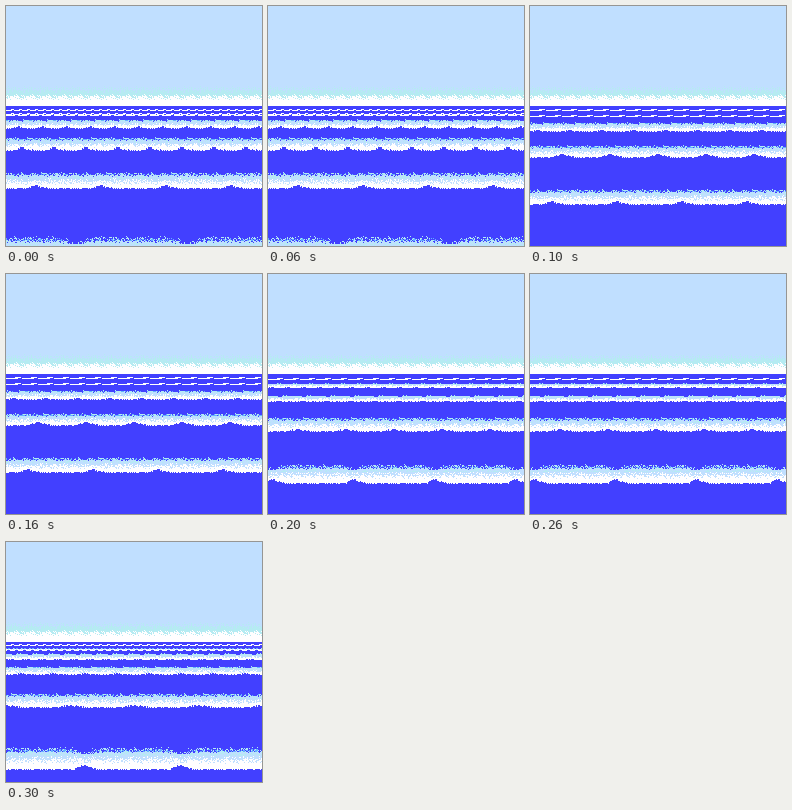
These frames come from a looping animation (256 px wide and 240 px high, 0.4 s). An HTML page with a canvas:

```html
<!DOCTYPE html>
<html lang="en">
<head>
<meta charset="utf-8">
<title>Rolling sea</title>
<style>
  html, body { margin: 0; width: 100%; height: 100%; overflow: hidden; background: #4240ff; }
  canvas { display: block; width: 100vw; height: 100vh; image-rendering: pixelated; }
</style>
</head>
<body>
<canvas id="sea" width="256" height="240"></canvas>
<script>
const WIDTH = 256, HEIGHT = 240, STEP = 100;
const SKY = '#c0dfff', CYAN = '#b5ebf2', WHITE = '#fffeff', SEA = '#4240ff', SPRAY = '#64b0ff';
const ctx = document.getElementById('sea').getContext('2d');

// Each swell: top, bottom, period, x of the first notch, notch depth, notch sharpness
const poses = [
  { ripples: [[104, 8], [108, 8], [109, 12]],
    swells: [[113, 123, 24, 12, 2, 1], [131, 145, 32, 16, 3, 2], [166, 183, 65, 30, 3, 6], [230, 256, 112, 70, 4, 8]] },
  { ripples: [[104, 16], [110, 16]],
    swells: [[116, 126, 32, 8, 1, 1], [139, 152, 48, 32, 3, 2], [183, 199, 65, 22, 3, 6]] },
  { ripples: [[105, 16]],
    swells: [[109, 114, 16, 4, 1, 1], [121, 128, 24, 10, 1, 1], [143, 158, 48, 30, 2, 2], [190, 210, 81, 5, 4, 8]] },
  { ripples: [[103, 8]],
    swells: [[106, 109, 8, 2, 1, 1], [111, 118, 16, 6, 1, 1], [124, 133, 32, 16, 1, 1], [151, 166, 64, 0, 2, 2], [205, 228, 96, 78, 4, 8]] }
];

function noise(x, y, seed) {
  let h = Math.imul(x + 17, 374761393) ^ Math.imul(y + 31, 668265263) ^ Math.imul(seed + 7, 1274126177);
  h = Math.imul(h ^ (h >>> 13), 1103515245);
  return ((h ^ (h >>> 16)) >>> 0) / 4294967296;
}

function rect(color, x, y, w = 1, h = 1) {
  ctx.fillStyle = color;
  ctx.fillRect(x, y, w, h);
}

function drawHorizon() {
  rect(SKY, 0, 0, WIDTH, 100);
  rect(WHITE, 0, 94, WIDTH, 6);
  for (let y = 80; y < 94; y++) {
    for (let x = 0; x < WIDTH; x++) {
      const n = noise(x % 16, y, 1);
      if (y >= 88 && n < (y - 87) / 7) rect(WHITE, x, y);
      else if (n < (y - 79) / 8) rect(CYAN, x, y);
    }
  }
}

function drawRipple([y, period]) {
  for (let x = 0; x < WIDTH; x++) {
    const at = x % period;
    if (at < period * 0.75) rect(WHITE, x, y);
    if (at > period * 0.55 && at < period * 0.9) rect(WHITE, x, y - 1);
  }
}

function drawSwell([top, bottom, period, phase, depth, sharpness]) {
  const height = bottom - top;
  for (let x = 0; x < WIDTH; x++) {
    const tileX = ((x - phase) % period + period) % period;
    const notch = ((1 + Math.cos(2 * Math.PI * (x - phase) / period)) / 2) ** (sharpness * 2);
    const edge = bottom - depth * notch - noise(tileX, 0, 2) * Math.min(2, height / 6);
    for (let y = top; y < Math.min(edge, HEIGHT); y++) {
      const level = (y - top + 0.5) / height;
      const cover = level / 0.28 - (depth > 3 && level < 0.3 ? notch * 0.7 : 0);
      const n = noise(tileX, y - top, 3);
      if (n > cover) continue;
      const foam = (level - 0.38) / 0.38;
      if (noise(tileX, y - top, 4) < foam) rect(WHITE, x, y);
      else rect(level < 0.2 && n > 0.25 ? SPRAY : level < 0.4 && n < 0.3 ? CYAN : SKY, x, y);
    }
  }
}

let shown = -1;
function draw(now) {
  const index = Math.floor(now / STEP) % poses.length;
  if (index !== shown) {
    shown = index;
    rect(SEA, 0, 100, WIDTH, HEIGHT - 100);
    poses[index].ripples.forEach(drawRipple);
    poses[index].swells.forEach(drawSwell);
  }
}

drawHorizon();
draw(0);
const start = performance.now();
function tick() {
  draw(performance.now() - start);
  requestAnimationFrame(tick);
}
requestAnimationFrame(tick);
</script>
</body>
</html>
```
